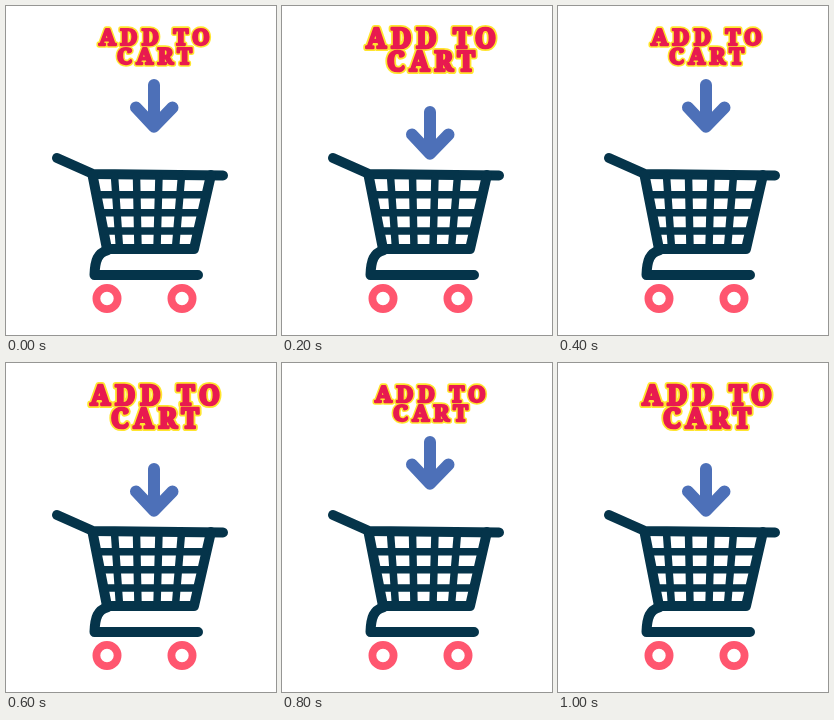
Animation, 270 px wide and 329 px high, one loop 1200 ms. Source, as an HTML page:

```html
<!DOCTYPE html>
<html lang="en">
<head>
<meta charset="utf-8">
<title>Add to cart</title>
<style>
  html, body { margin: 0; width: 100%; height: 100%; overflow: hidden; background: #fff; }
  svg { display: block; width: 100vw; height: 100vh; }
  .line { fill: none; stroke-linecap: round; stroke-linejoin: round; }
  .cart { stroke: #05344a; stroke-width: 10; }
  .grid { stroke-width: 7.5; }
  .arrow { stroke: #4d70b8; stroke-width: 12; }
  .wheel { stroke: #ff566f; stroke-width: 7.8; }
  text {
    font-family: "Noto Serif", "Liberation Serif", serif;
    font-weight: 900;
    text-anchor: middle;
    stroke-linejoin: round;
  }
  .small { font-size: 22.5px; letter-spacing: 4.3px; }
  .large { font-size: 26.5px; letter-spacing: 4.9px; }
  .rim { fill: #ffe52e; stroke: #ffe52e; stroke-width: 0.235em; }
  .face { fill: #e81a50; stroke: #e81a50; stroke-width: 0.1em; }
</style>
</head>
<body>
<svg viewBox="0 0 270 329">
  <g class="line cart">
    <path d="M51 152 L87 168 L217 169.5"/>
    <path d="M86.5 169 L101 243 H188 L205 169"/>
    <path d="M101 244.5 C92 247 89 254 88.5 269 H192"/>
    <path class="grid" d="M91 188.700 H199 M95 206.700 H195 M98 225 H191
      M108.500 170 L113.500 242 M130.500 170 L132 242 M153 170 L151 242 M175.500 170 L169.500 242"/>
  </g>
  <g class="line wheel">
    <circle cx="101" cy="292.500" r="10.600"/>
    <circle cx="176" cy="292.500" r="10.600"/>
  </g>
  <path id="arrow" class="line arrow" d="M148 79 V120 M130 101.500 L148 120.700 L166.500 101.500"/>
  <g id="label"></g>
</svg>
<script>
  const STEP = 200;
  const poses = [
    { size: "small", x: 150.6, lines: [38.5, 57.8], drop: 0 },
    { size: "large", x: 151.4, lines: [42, 65], drop: 27 }
  ];
  const words = ["ADD TO", "CART"];
  const arrow = document.getElementById("arrow");
  const label = document.getElementById("label");

  // Every rim lies below every face, so the outlines merge.
  const texts = ["rim", "face"].flatMap(layer => words.map((word, row) => {
    const el = document.createElementNS("http://www.w3.org/2000/svg", "text");
    el.setAttribute("class", layer);
    el.textContent = word;
    label.append(el);
    return { el, row };
  }));

  let shown = -1;

  function draw(time) {
    const index = Math.floor(time / STEP) % poses.length;
    if (index === shown) return;
    shown = index;
    const pose = poses[index];
    label.setAttribute("class", pose.size);
    for (const { el, row } of texts) {
      el.setAttribute("x", pose.x);
      el.setAttribute("y", pose.lines[row]);
    }
    arrow.setAttribute("transform", `translate(0 ${pose.drop})`);
  }

  const start = performance.now();
  function tick() {
    draw(performance.now() - start);
    requestAnimationFrame(tick);
  }
  tick();
</script>
</body>
</html>
```
